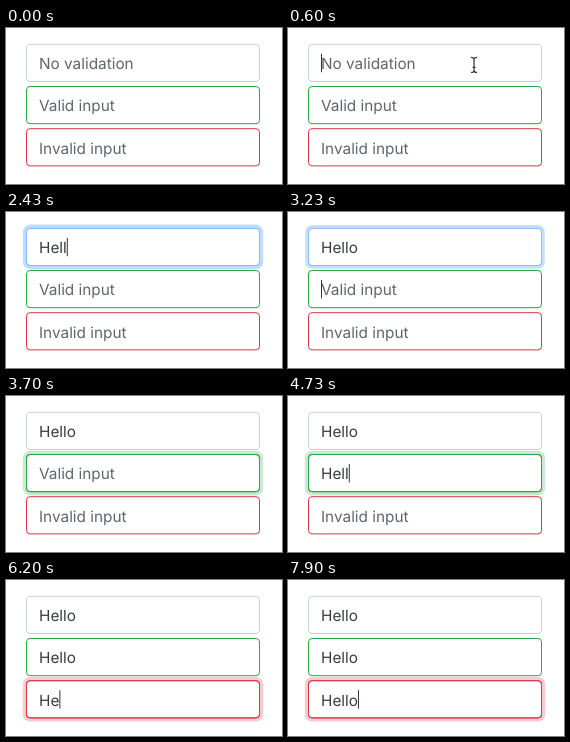
Animation, 276 px wide and 156 px high, one loop 8000 ms. Source, as an HTML page:

```html
<!DOCTYPE html>
<html lang="en">
<head>
<meta charset="utf-8">
<title>Input validation states</title>
<style>
  html, body { margin: 0; width: 100%; height: 100%; overflow: hidden; background: #fff; }
  svg { display: block; width: 276px; height: 156px; }
  text { font: 15.35px Inter, "Open Sans", sans-serif; text-rendering: geometricPrecision; }
  .box { fill: #fff; stroke: var(--line); }
  .glow { fill: none; stroke: var(--focus); }
  .ring { fill: var(--focus); }
  .hint { fill: #5e666d; }
  .entry { fill: #363c42; }
  .caret { fill: #30363b; }
  .plain { --line: #c8d0d8; --focus: #80bdff; }
  .plain .ring { fill: #007bff; }
  .valid { --line: #28a745; --focus: #28a745; }
  .invalid { --line: #dc3545; --focus: #dc3545; }
  #pointer { fill: none; }
</style>
</head>
<body>
<svg id="stage" viewBox="0 0 276 156">
  <defs><path id="beam" d="M-3-7.5Q0-7.5 0-5.5Q0-7.5 3-7.5M0-5.5V5.5M-3 7.5Q0 7.5 0 5.5Q0 7.5 3 7.5M-1.5 2.5H1.5"/></defs>
  <g id="pointer">
    <use href="#beam" stroke="#fff" stroke-width="2.6"/>
    <use href="#beam" stroke="#333" stroke-width="1.2"/>
  </g>
</svg>
<script>
const LOOP = 8000, BLINK = 500, FADE = 150, WORD = "Hello";
const LEFT = 20, TOP = 15.8, PITCH = 42.2, WIDTH = 234, HEIGHT = 38.2;
const PAD = 13, BASE = 25.4, SPREAD = 3.2;

const fields = [
  { kind: "plain", hint: "No validation", focus: 600, blur: 3200, keys: [1800, 2000, 2270, 2430, 2800] },
  { kind: "valid", hint: "Valid input", focus: 3200, blur: 5130, keys: [3900, 4300, 4570, 4730, 4900] },
  { kind: "invalid", hint: "Invalid input", focus: 5130, blur: Infinity, keys: [5900, 6200, 7270, 7430, 7770] }
];

// time, x, y
const route = [[270, 208, -10], [430, 189, 28], [600, 186, 37], [730, 191, 24], [800, 196, -10]];

const stage = document.getElementById("stage");
const pointer = document.getElementById("pointer");

function set(el, attrs) {
  for (const key in attrs) el.setAttribute(key, attrs[key]);
  return el;
}

function add(parent, tag, attrs) {
  const el = document.createElementNS("http://www.w3.org/2000/svg", tag);
  return parent.appendChild(set(el, attrs));
}

// Rounded field outline grown outwards by d
function frame(d) {
  return { x: -d, y: -d, width: WIDTH + 2 * d, height: HEIGHT + 2 * d, rx: 4 + d };
}

fields.forEach((f, i) => {
  const g = add(stage, "g", { class: f.kind, transform: `translate(${LEFT} ${TOP + PITCH * i})` });
  f.ring = add(g, "rect", { class: "ring" });
  add(g, "rect", { class: "box", ...frame(-.5) });
  f.glow = add(g, "rect", { class: "glow", ...frame(-.5) });
  f.label = add(g, "text", { class: "hint", x: PAD, y: BASE });
  f.label.textContent = f.hint;
  f.text = add(g, "text", { class: "entry", x: PAD, y: BASE });
  f.caret = add(g, "rect", { class: "caret", y: 10, width: 1, height: 18.4 });
});
stage.append(pointer);

function ease(t, start) {
  const p = Math.min(1, Math.max(0, (t - start) / FADE));
  return p * p * (3 - 2 * p);
}

function show(el, on) {
  el.style.visibility = on ? "visible" : "hidden";
}

function drawField(f, t) {
  const typed = f.keys.filter(k => k <= t).length;
  const last = typed ? f.keys[typed - 1] : f.focus;
  const active = t >= f.focus && t < f.blur;
  const lit = Math.floor((t - last) / BLINK) % 2 === 0;
  const amount = ease(t, f.focus) - ease(t, f.blur);
  f.glow.style.opacity = amount;
  set(f.ring, { ...frame(SPREAD * amount), opacity: .25 * amount });
  show(f.label, !typed);
  f.text.textContent = WORD.slice(0, typed);
  set(f.caret, { x: PAD + (typed && f.text.getComputedTextLength()) });
  show(f.caret, active && lit);
}

function drawPointer(t) {
  const i = route.findIndex(p => p[0] > t);
  show(pointer, i > 0);
  if (i < 1) return;
  const [t0, x0, y0] = route[i - 1], [t1, x1, y1] = route[i];
  const p = (t - t0) / (t1 - t0);
  set(pointer, { transform: `translate(${x0 + (x1 - x0) * p} ${y0 + (y1 - y0) * p})` });
}

const start = performance.now();

function draw() {
  const t = (performance.now() - start) % LOOP;
  fields.forEach(f => drawField(f, t));
  drawPointer(t);
  requestAnimationFrame(draw);
}
draw();
</script>
</body>
</html>
```
